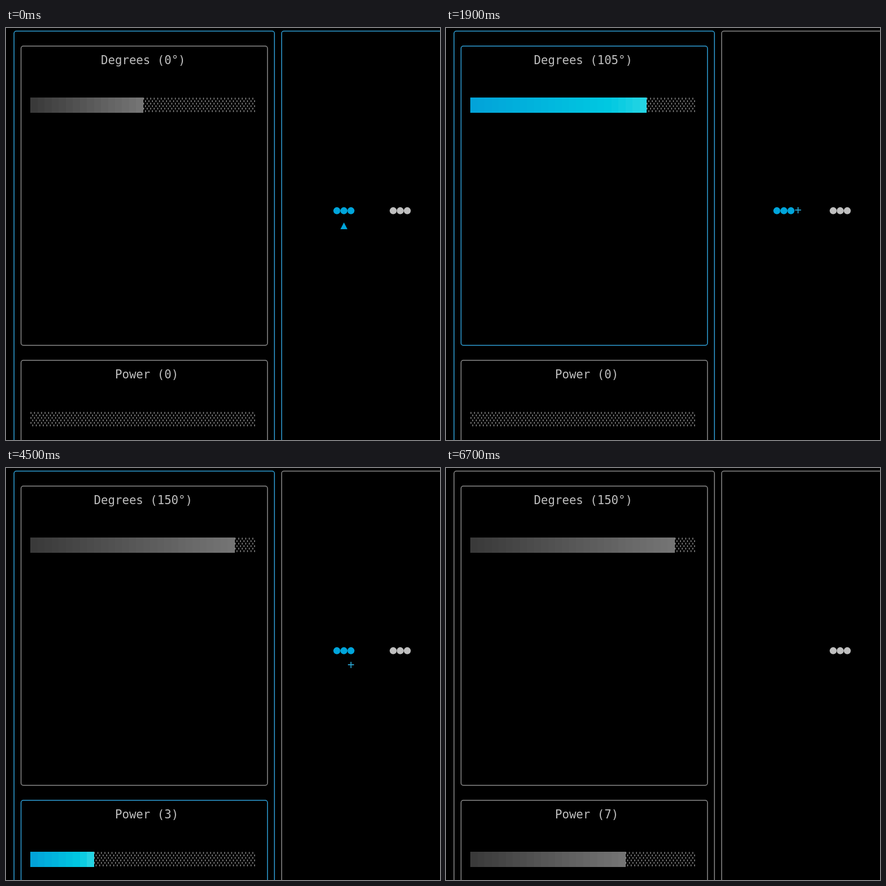
Write an HTML page with a canvas that moves like this. It is 768x729 px and loops after 7.3 s.

```html
<!DOCTYPE html>
<html lang="en">
<head>
<meta charset="utf-8">
<title>Angle and power</title>
<style>
  html, body { margin: 0; width: 100%; height: 100%; overflow: hidden; background: #000; }
  canvas { display: block; width: 768px; height: 729px; }
</style>
</head>
<body>
<canvas id="stage" width="768" height="729"></canvas>
<script>
const ctx = document.getElementById('stage').getContext('2d');

const LOOP = 7300;
const CELL_W = 12.46, CELL_H = 26.48;
const ORIGIN_X = 6.1, ORIGIN_Y = -9.4;
const BAR_CELLS = 32;
const BLUE = '#00a5db', BLUE_LINE = '#2f9fd6';
const GREY = '#bfbfbf', GREY_LINE = '#8a8a8a';

const GREY_RAMP = [[0, 58, 58, 58], [1, 116, 116, 116]];
const BLUE_RAMP = [[0, 2, 163, 217], [0.8, 0, 200, 225], [1, 36, 212, 228]];

const colX = col => ORIGIN_X + col * CELL_W;
const rowY = row => ORIGIN_Y + row * CELL_H;
const clamp = (v, lo, hi) => Math.min(hi, Math.max(lo, v));

// Key repeat: counts presses since start, one every interval.
const presses = (t, start, interval) =>
  t < start ? 0 : Math.floor((t - start) / interval) + 1;

function stateAt(time) {
  const t = Math.floor(time / 100) * 100;
  return {
    degrees: 15 * Math.min(10, presses(t, 1400, 75)),
    power: Math.min(7, (t >= 3800 ? 1 : 0) + presses(t, 4400, 100)),
    choosing: t < 600,
    aiming: t >= 600 && t < 5200,
    turn: t < 5200,
    editDegrees: t >= 600 && t < 3000,
    editPower: t >= 3000 && t < 5200,
    powerLit: t >= 3000 && t < 6000,
    shipAlive: t < 5600
  };
}

function rampColor(ramp, f) {
  const i = ramp.findIndex((stop, k) => k > 0 && f <= stop[0]);
  const a = ramp[i - 1], b = ramp[i];
  const k = (f - a[0]) / (b[0] - a[0]);
  const mix = n => Math.round(a[n] + (b[n] - a[n]) * k);
  return `rgb(${mix(1)},${mix(2)},${mix(3)})`;
}

function panel(left, top, right, bottom, active) {
  ctx.strokeStyle = active ? BLUE_LINE : GREY_LINE;
  ctx.lineWidth = 1.5;
  ctx.beginPath();
  ctx.roundRect(left, top, right - left, bottom - top, 4);
  ctx.stroke();
}

function text(str, col, row, color) {
  ctx.font = '20.7px "DejaVu Sans Mono", monospace';
  ctx.fillStyle = color;
  ctx.fillText(str, colX(col), rowY(row) + 20.4);
}

function title(str, row) {
  text(str, 19 - Math.floor(str.length / 2), row, GREY);
}

function bar(row, fraction, lit) {
  const filled = Math.floor(clamp(fraction, 0, 1) * BAR_CELLS + 1e-6);
  const x = colX(3), y = rowY(row);
  const ramp = lit ? BLUE_RAMP : GREY_RAMP;
  for (let i = 0; i < filled; i++) {
    const from = Math.round(x + i * CELL_W);
    const to = Math.round(x + (i + 1) * CELL_W);
    ctx.fillStyle = rampColor(ramp, filled > 1 ? i / (filled - 1) : 0);
    ctx.fillRect(from, Math.round(y), to - from, 27);
  }
  // Unfilled cells: staggered short dashes.
  ctx.fillStyle = '#8e8e8e';
  for (let line = 0; line < 6; line++) {
    const shift = line % 2 ? CELL_W / 4 : 0;
    for (let i = filled * 2; i < BAR_CELLS * 2; i++) {
      ctx.fillRect(x + i * CELL_W / 2 + shift, y + 0.4 + line * CELL_H / 6, 1.5, 3.2);
    }
  }
}

function ship(col, color) {
  ctx.fillStyle = color;
  for (let i = -1; i <= 1; i++) {
    ctx.beginPath();
    ctx.arc(colX(col + i + 0.5), 323.3, 6.2, 0, Math.PI * 2);
    ctx.fill();
  }
}

function pointer(x, y) {
  ctx.fillStyle = BLUE;
  ctx.beginPath();
  ctx.moveTo(x, y - 6);
  ctx.lineTo(x + 6.2, y + 6);
  ctx.lineTo(x - 6.2, y + 6);
  ctx.fill();
}

function crosshair(degrees) {
  const a = degrees * Math.PI / 180;
  const dx = Math.floor(3 * Math.sin(a) + 1e-6);
  const dy = Math.floor(-2 * Math.cos(a) + 1e-6);
  text('+', 47 + dx, 12 + dy, '#2aa5d2');
}

function draw(time) {
  const s = stateAt(time);
  ctx.fillStyle = '#000';
  ctx.fillRect(0, 0, 768, 729);

  panel(14.2, 5.6, 475, 800, s.turn);
  panel(487.7, 5.6, 900, 800, s.choosing);
  panel(26.6, 32, 462.7, 561.4, s.editDegrees);
  panel(26.6, 588, 462.7, 800, s.editPower);

  title(`Degrees (${s.degrees}°)`, 2);
  bar(5, (s.degrees + 180) / 360, s.editDegrees);
  title(`Power (${s.power})`, 23);
  bar(26, s.power / 10, s.powerLit);

  if (s.shipAlive) ship(47, s.turn ? BLUE : GREY);
  ship(55, GREY);
  if (s.choosing) pointer(598, 350);
  if (s.aiming) crosshair(s.degrees);
}

function tick() {
  draw(performance.now() % LOOP);
  requestAnimationFrame(tick);
}
tick();
</script>
</body>
</html>
```
